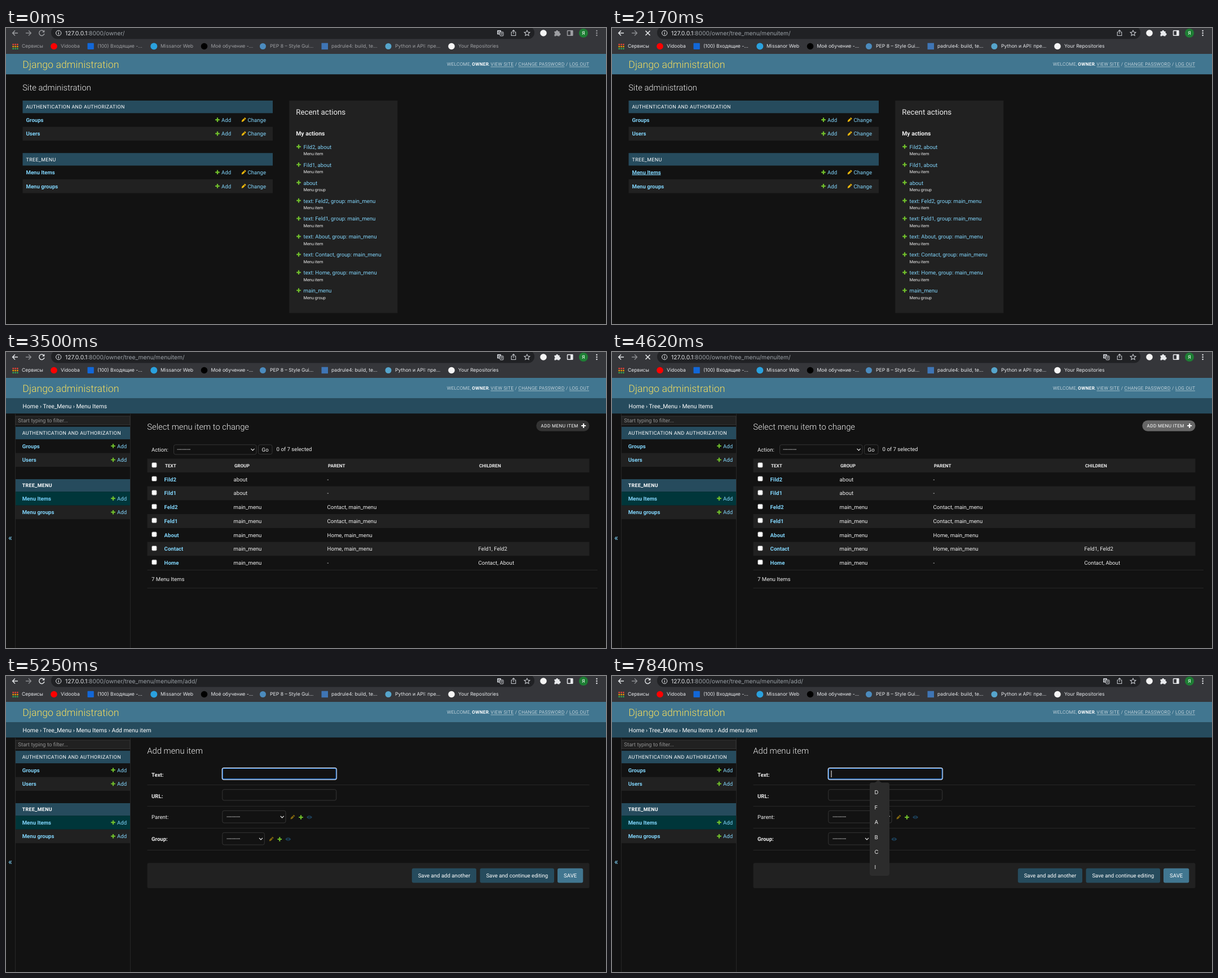
Write an HTML page that moves like this. It is 1064 px wide and 526 px high and loops after 8000 ms.

```html
<!DOCTYPE html>
<html lang="en">
<head>
<meta charset="utf-8">
<title>Menu administration</title>
<style>
  html, body { margin: 0; width: 100%; height: 100%; overflow: hidden; background: #121212; }
  svg { display: block; width: 1064px; height: 526px; }
  text { font-family: Roboto, sans-serif; white-space: pre; text-rendering: geometricPrecision; }
  .ui { font-family: Inter, "Noto Sans", sans-serif; }
</style>
</head>
<body>
<svg id="stage" viewBox="0 0 1064 526"></svg>
<script>
const LOOP = 8000;
const BG = '#121212', ALT = '#212121', LINE = '#353535', HAIR = '#272727';
const PRIMARY = '#264b5d', SECONDARY = '#417690', LINK = '#81d4fa', FG = '#eeeeee';
const S = 0.74; // page zoom

// y is the middle of the capitals; px is the size before zooming
const raw = (x, y, str, size, fill, attrs = '') =>
  `<text x="${x}" y="${y + size * 0.356}" font-size="${size}" fill="${fill}" ${attrs}>${str}</text>`;
const text = (x, y, str, px = 13, fill = FG, attrs = '') => raw(x, y, str, px * S, fill, attrs);
const bold = (x, y, str, px = 13, fill = FG, attrs = '') => text(x, y, str, px, fill, 'font-weight="700" ' + attrs);
const caps = (x, y, str, px, attrs = '') => text(x, y, str, px, '#fff', 'letter-spacing="0.37" ' + attrs);
const ui = (x, y, str, size, fill, attrs = '') => raw(x, y, str, size, fill, 'class="ui" ' + attrs);

// rectangles are given by their edges
const rect = (x1, y1, x2, y2, fill, r = 0, attrs = '') =>
  `<rect x="${x1}" y="${y1}" width="${x2 - x1}" height="${y2 - y1}" rx="${r}" fill="${fill}" ${attrs}/>`;
const box = (x1, y1, x2, y2, r = 3) => rect(x1, y1, x2, y2, BG, r, `stroke="${LINE}"`);
const hline = (x1, x2, y, color = HAIR) => rect(x1, y - 0.5, x2, y + 0.5, color);
const disc = (x, y, r, fill) => `<circle cx="${x}" cy="${y}" r="${r}" fill="${fill}"/>`;
const stroke = (d, color, w = 1.4, attrs = '') =>
  `<path d="${d}" fill="none" stroke="${color}" stroke-width="${w}" ${attrs}/>`;
const group = (id, body, attrs = '') => `<g id="${id}" ${attrs}>${body}</g>`;

const plus = (x, y, color = '#70bf2b', r = 3.8) =>
  stroke(`M${x - r} ${y}h${2 * r}M${x} ${y - r}v${2 * r}`, color, 2.2);
const pencil = (x, y, alpha = 1) =>
  `<g transform="translate(${x} ${y}) rotate(-45)" opacity="${alpha}">` +
  `<path d="M-5 0L-2.6 -1.6H2V1.6H-2.6Z" fill="#efb80b"/>${rect(2.6, -1.6, 4.8, 1.6, '#efb80b', 0.6)}</g>`;
const eye = (x, y) =>
  `<path d="M${x - 5} ${y}q5 -6 10 0q-5 6 -10 0Z" fill="#1d4460"/>${disc(x, y, 1.9, BG)}${disc(x, y, 1, '#1d4460')}`;
const chevron = (x, y) => stroke(`M${x - 3} ${y - 1.5}l3 3l3 -3`, FG, 1.2);

function toolbar() {
  const light = '#e8eaed', grey = '#9aa0a6';
  const marks = [
    [28, 'Сервисы'], [97, 'Vidooba'], [162, '(100) Входящие -...'], [274, 'Missanor Web'],
    [363.5, 'Моё обучение -...'], [468, 'PEP 8 – Style Gui...'], [577, 'padrule4: build, te...'],
    [690, 'Python и API: пре...'], [802, 'Your Repositories']];
  const dotColors = ['#ea4335', '#f29900', '#34a853'];
  let apps = '';
  for (let i = 0; i < 9; i++)
    apps += rect(11.5 + i % 3 * 3.8, 28 + (i / 3 | 0) * 3.8, 14 + i % 3 * 3.8, 30.5 + (i / 3 | 0) * 3.8, dotColors[i / 3 | 0], 0.5);
  const puzzle = `<path d="M972.5 6h2.7a2 2 0 0 1 4 0h2.4v3a2 2 0 0 1 0 4v1.6h-3a2 2 0 0 0 -3.6 0h-2.5v-3a2 2 0 0 0 0 -3.4Z" fill="${light}"/>`;
  const active = marks.map(([x, s]) => ui(x, 32.3, s, 8.65, light)).join('') +
    stroke('M21 9H12M16 4.6L11.6 9L16 13.4', light) +
    group('reload', stroke('M67.3 6.2A4.7 4.7 0 1 0 68 10', light) + `<path d="M68.4 3.6v4.2h-4.2Z" fill="${light}"/>`) +
    group('stop', stroke('M59.5 5l8 8M67.5 5l-8 8', light, 1.6)) +
    puzzle + rect(995.5, 4.7, 1005, 13.3, 'none', 0.6, `stroke="${light}" stroke-width="1.4"`) + rect(1001, 4.7, 1005, 13.3, light) +
    [5, 9, 13].map(y => disc(1047.6, y, 1.2, light)).join('');
  return rect(0, 0, 1064, 46, '#35363a') + rect(80, -3, 937, 19.5, '#202124', 11) +
    group('active', active) +
    stroke('M35 9H44.5M40 4.6L44.4 9L40 13.4', '#8b8d91') +
    `<circle cx="93.2" cy="9" r="4.6" fill="none" stroke="${light}"/>` + rect(92.6, 8.3, 93.8, 11.6, light) + rect(92.6, 6.2, 93.8, 7.4, light) +
    ui(105, 9.2, `<tspan fill="${light}">127.0.0.1</tspan>:8000<tspan id="path"></tspan>`, 10.3, grey) +
    group('translate',
      rect(871, 4, 878, 11.5, '#c4c7cc', 1) + ui(872.2, 7.8, 'G', 6, '#35363a', 'font-weight="700"') +
      rect(876, 7, 882, 14, '#202124', 1, 'stroke="#c4c7cc"') + stroke('M877.3 9h3.6M879.2 8v1M880.4 9q-.6 2.4-2.8 3.4M878 10q.8 1.8 2.8 2.4', '#c4c7cc', 0.7)) +
    stroke('M898 7.3h-1.8v6.2h7.6V7.3h-1.8M900 10.5V4M897.8 6L900 3.8L902.2 6', '#c4c7cc', 1.1) +
    stroke('M924 4.2l1.5 3.1 3.4.4-2.5 2.3.7 3.4-3.1-1.7-3.1 1.7.7-3.4-2.5-2.3 3.4-.4Z', '#c4c7cc', 1.1) +
    disc(953, 9, 5.8, '#f4f4f4') + disc(1024, 9, 8, '#1e7e34') + ui(1024, 9, 'Я', 8.5, '#fff', 'text-anchor="middle"') +
    apps + disc(85, 32.5, 5.8, '#f00') + rect(144.5, 26.8, 155.8, 38, '#1267d8', 1) + disc(262.3, 32.5, 6, '#2aa1de') +
    disc(351.5, 32.5, 5.8, '#000') + disc(455.5, 32.5, 5.5, '#4b8bbe') + rect(559.5, 26.7, 571, 38.2, '#3f75b5') +
    disc(678, 32.5, 5.5, '#56a5cc') + disc(790, 32.5, 5.8, '#f5f5f5');
}

function siteHeader() {
  return rect(0, 46, 1064, 82.3, SECONDARY) +
    text(29.3, 64.6, 'Django administration', 24, '#f5dd5d', 'font-weight="300"') +
    caps(782, 64, 'WELCOME,', 11, 'font-weight="300"') +
    caps(826.3, 64, 'OWNER', 11, 'font-weight="700"') + caps(856, 64, '.', 11) +
    [[859.5, 900.5, 'VIEW SITE'], [908.5, 990.5, 'CHANGE PASSWORD'], [999, 1034, 'LOG OUT']]
      .map(([a, b, s]) => caps(a, 64, s, 11, 'font-weight="300"') + hline(a, b, 69, '#a0bbc8')).join('') +
    caps(902.7, 64, '/', 11, 'font-weight="300"') + caps(993, 64, '/', 11, 'font-weight="300"');
}

const apps = [
  ['AUTHENTICATION AND AUTHORIZATION', 'Groups', 'Users'],
  ['TREE_MENU', 'Menu Items', 'Menu groups']];

function dashboard() {
  const modules = apps.map(([title, ...models], m) => {
    const top = 129 + m * 93.2;
    return rect(29.5, top, 473, top + 22.3, PRIMARY) + caps(35.5, top + 11.2, title, 12) +
      models.map((name, i) => {
        const y = top + 34.4 + i * 24.5;
        return (i ? rect(29.5, y - 12.2, 473, y + 12.3, ALT) : '') + bold(35.5, y, name, 13, LINK) +
          plus(375, y - 0.3) + text(382, y, 'Add', 13, LINK) + pencil(421.3, y) + text(428.5, y, 'Change', 13, LINK);
      }).join('');
  }).join('');
  const recent = ['Fild2, about', 'Fild1, about', 'about',
    ...['Feld2', 'Feld1', 'About', 'Contact', 'Home'].map(s => `text: ${s}, group: main_menu`), 'main_menu'];
  return text(29.3, 105.7, 'Site administration', 20, FG, 'font-weight="300"') + modules +
    group('underline', hline(35.5, 86.5, 261, LINK)) +
    rect(502.3, 129, 694.3, 506.5, ALT) + text(514.3, 148.8, 'Recent actions', 18) + bold(514.3, 187.2, 'My actions', 14) +
    recent.map((s, i) => {
      const y = 211.3 + i * 31.93;
      return plus(519, y - 0.5) + text(527.5, y, s, 13, LINK) +
        text(527.5, y + 12.3, s.includes(' ') ? 'Menu item' : 'Menu group', 10);
    }).join('');
}

function sidebar() {
  return rect(0, 82.3, 1064, 109.3, PRIMARY) +
    group('crumbs', '') +
    rect(16, 109.3, 17, 526, HAIR) + rect(220, 109.3, 221, 526, HAIR) +
    text(3.9, 329.5, '«', 20, LINK) +
    rect(17, 114, 220, 129.3, ALT, 0, `stroke="${LINE}"`) + text(21.3, 121.8, 'Start typing to filter...', 13, '#8f8f8f') +
    apps.map(([title, ...models], m) => {
      const top = 132.8 + m * 93.2;
      return rect(17, top, 220, top + 22.3, PRIMARY) + caps(28.7, top + 11.2, title, 12, m ? 'font-weight="700"' : '') +
        models.map((name, i) => {
          const y = top + 34.4 + i * 24.5, current = m && !i;
          return (i || current ? rect(17, y - 12.2, 220, y + 12.3, current ? '#00363a' : ALT) : '') +
            bold(28.7, y, name, 13, LINK, current ? 'id="current"' : '') +
            plus(190, y - 0.2) + text(197, y, 'Add', 13, LINK);
        }).join('');
    }).join('');
}

function listPage() {
  const check = y => rect(258.6, y - 4.4, 267.2, y + 4.2, '#fff', 1.8, 'stroke="#767676" stroke-width="0.8"');
  const rows = [
    ['Fild2', 'about', '-'], ['Fild1', 'about', '-'],
    ['Feld2', 'main_menu', 'Contact, main_menu'], ['Feld1', 'main_menu', 'Contact, main_menu'],
    ['About', 'main_menu', 'Home, main_menu'], ['Contact', 'main_menu', 'Home, main_menu', 'Feld1, Feld2'],
    ['Home', 'main_menu', '-', 'Contact, About']];
  const cols = [280.6, 403.6, 569.6, 837.6];
  return text(250.3, 132.8, 'Select menu item to change', 20, FG, 'font-weight="300"') +
    rect(940.3, 121.5, 1034.5, 140.7, '#333', 9.6, 'id="addButton"') + caps(948.6, 131, 'ADD MENU ITEM', 11) + plus(1024.2, 131, '#fff', 4) +
    text(258, 173.3, 'Action:') + box(297.5, 164.8, 444, 182) + text(303.3, 173, '---------') + chevron(437.5, 173.3) +
    box(447.5, 164.8, 472, 181.6) + text(453.6, 173.3, 'Go') + text(479.6, 172.8, '0 of 7 selected') +
    rect(250.5, 189.5, 1034.5, 214, ALT) + check(201) +
    ['TEXT', 'GROUP', 'PARENT', 'CHILDREN'].map((s, i) => bold(cols[i] + 1.4, 201.7, s, 11)).join('') +
    rows.map((row, k) => {
      const y = 226.3 + k * 24.72;
      return (k % 2 ? rect(250.5, y - 12.4, 1034.5, y + 12.3, ALT) : '') + check(y - 1) +
        row.map((s, i) => i ? text(cols[i], y, s) : bold(cols[i], y, s, 13, LINK)).join('');
    }).join('') +
    hline(250.5, 1049, 387.5) + text(258, 404, '7 Menu Items') + hline(250.5, 1049, 419.5);
}

function formPage() {
  const related = (x, y) => pencil(x, y, 0.5) + plus(x + 15, y) + eye(x + 30, y);
  const button = (x1, x2, label, fill) => rect(x1, 341.7, x2, 367.6, fill, 3) +
    text((x1 + x2) / 2, 354.7, label, 13, '#fff', 'text-anchor="middle"');
  return text(250.3, 132.8, 'Add menu item', 20, FG, 'font-weight="300"') +
    bold(258, 175.5, 'Text:') + bold(258, 213.2, 'URL:') + text(258, 251, 'Parent:') + bold(258, 290, 'Group:') +
    [193.5, 231.5, 270.5, 309.5].map(y => hline(250.5, 1034.5, y)).join('') +
    box(383.8, 164, 585.7, 183.5) + box(383.8, 201.7, 585.7, 221) +
    box(383.8, 239.3, 496, 261) + text(391.3, 250, '---------') + chevron(489.7, 250.3) + related(508, 251) +
    box(383.8, 278.3, 458.3, 300) + text(391.3, 289, '---------') + chevron(452, 289.3) + related(470.3, 290) +
    rect(250.5, 332.2, 1034.5, 377, ALT, 3) +
    button(719.8, 834, 'Save and add another', PRIMARY) +
    button(840.5, 972, 'Save and continue editing', PRIMARY) + button(978, 1023.3, 'SAVE', SECONDARY) +
    group('focus', rect(383.3, 163.4, 586.2, 184, BG, 3, 'stroke="#e6f0ff" stroke-width="1.3"') +
      rect(384.4, 164.5, 585.1, 182.9, BG, 2, 'stroke="#1b6fd0" stroke-width="1.2"') + rect(388.5, 168, 389.5, 180, '#fff', 0, 'id="caret"')) +
    group('popup', '<path d="M465.5 190L472 184.8L478.5 190Z" fill="#2c2c2c"/>' + rect(457, 189.6, 492, 355, '#2c2c2c', 4) +
      [...'DFABCI'].map((c, i) => ui(465.4, 206.6 + i * 26.6, c, 9.6, '#f0f0f0')).join(''));
}

const stage = document.getElementById('stage');
stage.innerHTML = rect(0, 0, 1064, 526, BG) + group('dashboard', dashboard()) +
  group('inner', sidebar() + group('list', listPage()) + group('form', formPage())) + siteHeader() + toolbar();

const el = Object.fromEntries([...stage.querySelectorAll('[id]')].map(n => [n.id, n]));
const show = (node, on) => node.setAttribute('visibility', on ? 'inherit' : 'hidden');
const ramp = (t, from, steps) => Math.max(0, Math.min(1, (Math.floor((t - from) / 70) + 1) / steps));
const mix = (a, b, k) => `rgb(${a.map((v, i) => Math.round(v + (b[i] - v) * k))})`;
const within = (t, ...spans) => spans.some(([a, b]) => t >= a && t < b);

const trail = 'Home › Tree_Menu › Menu Items';
const crumbs = [trail, trail + ' › Add menu item'].map(s => text(29.5, 96, s, 14, '#fff'));
const root = '/owner/', items = root + 'tree_menu/menuitem/';
let shownTrail = -1;

function draw(t) {
  const onList = within(t, [2240, 4690]), onForm = t >= 4690;
  show(el.dashboard, t < 2240);
  show(el.inner, t >= 2240);
  show(el.list, onList);
  show(el.form, onForm);
  show(el.underline, within(t, [2030, 2240]));
  if (shownTrail !== +onForm) {
    shownTrail = +onForm;
    el.crumbs.innerHTML = crumbs[shownTrail];
  }

  el.path.textContent = t < 2170 ? root : onForm ? items + 'add/' : items;
  el.active.setAttribute('opacity', 0.58 + 0.42 * ramp(t, 1610, 2));
  const loading = within(t, [2100, 2240], [4620, 4760]);
  show(el.stop, loading);
  show(el.reload, !loading);
  show(el.translate, !within(t, [2170, 2240], [4690, 4760]));

  const hover = t < 2310 ? 0 : 1 - ramp(t, 3360, 4);
  el.current.setAttribute('fill', mix([129, 212, 250], [74, 193, 247], hover));
  const lit = Math.round(51 + 51 * ramp(t, 4130, 3));
  el.addButton.setAttribute('fill', `rgb(${lit},${lit},${lit})`);

  show(el.focus, t >= 4760);
  show(el.caret, within(t, [4760, 5250], [5810, 6300], [6790, 7350], [7840, LOOP]));
  el.popup.setAttribute('opacity', ramp(t, 5670, 3));
}

const start = performance.now();
function tick() {
  draw((performance.now() - start) % LOOP);
  requestAnimationFrame(tick);
}
tick();
</script>
</body>
</html>
```
